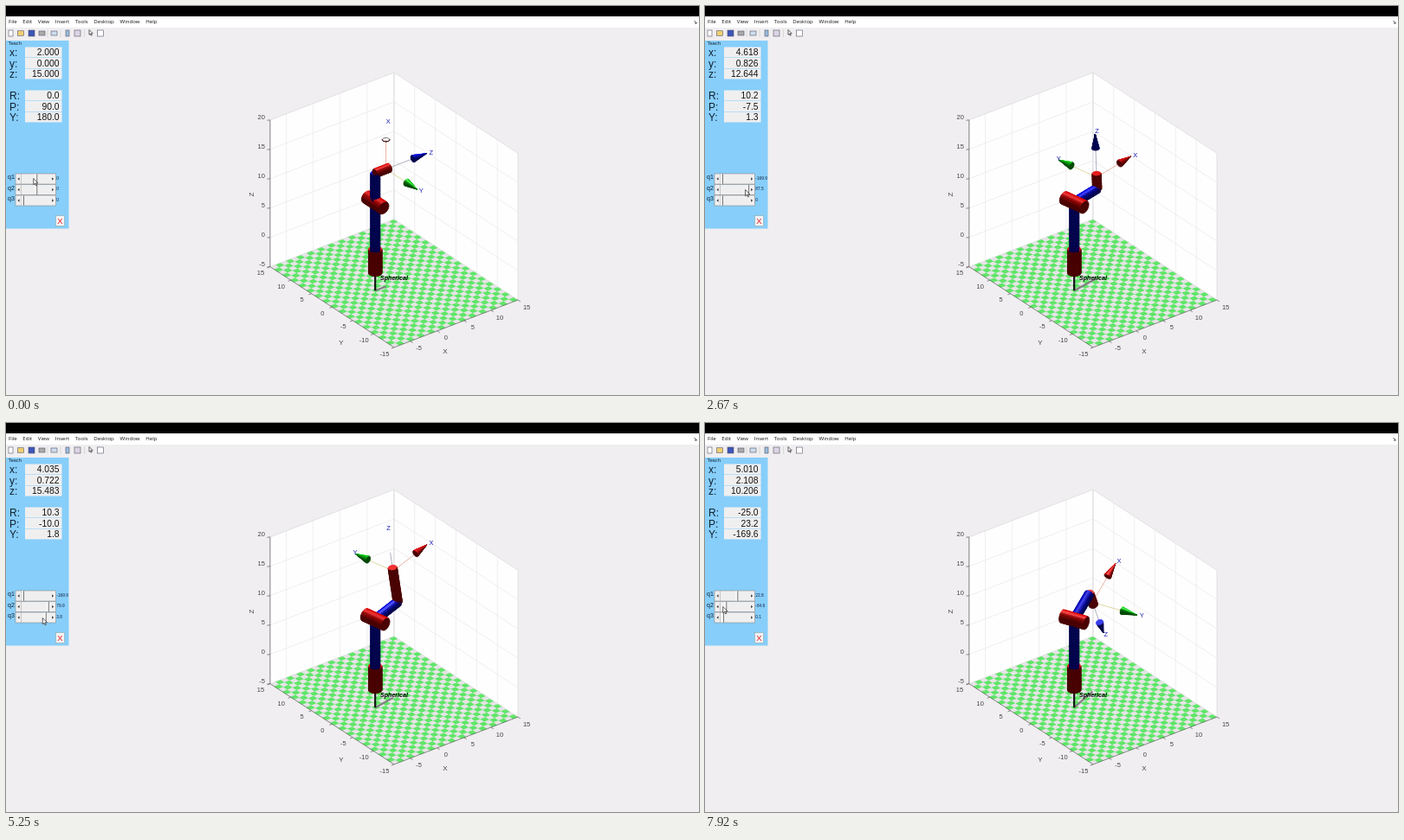
Animation of 800 by 450 pixels, one loop 8 s. Source, as an HTML page with a canvas:

```html
<!DOCTYPE html>
<html lang="en">
<head>
<meta charset="utf-8">
<title>Robot teach panel</title>
<style>
html, body { margin: 0; width: 800px; height: 450px; overflow: hidden; }
canvas { display: block; }
</style>
</head>
<body>
<canvas id="stage" width="800" height="450"></canvas>
<script>
const g = document.getElementById('stage').getContext('2d');
const LOOP = 8000, STEP = 1000 / 12, DEG = Math.PI / 180;
const RED = [245, 8, 8], BLUE = [8, 12, 255], GREEN = [10, 235, 20];
const INK = '#444';

// Slider drags; each one eases from the joint's present value
const drag = (joint, start, end, to) => ({ joint, start, end, to });
const DRAGS = [
  drag(0, 300, 950, -169.86),
  drag(1, 1546, 2891, 90),
  drag(1, 2950, 3550, -90),
  drag(2, 3650, 3830, .352),
  drag(1, 4200, 4700, 79.86),
  drag(2, 4882.1, 5425.1, 4.2),
  drag(2, 5500, 6000, .1412),
  drag(1, 6350, 6850, -50),
  drag(0, 7000, 7450, 22.82),
  drag(1, 7550, 7740, -64.649),
];
const RANGES = [[-170, 170], [-90, 90], [0, 4.5]];

const easeOut = u => 1 - (1 - Math.min(1, Math.max(0, u))) ** 2;
const progress = (t, a, b) => easeOut((t - a) / (b - a));
const mix = (a, b, k) => a + (b - a) * k;

const jointAt = (joint, t) => DRAGS.filter(d => d.joint === joint)
  .reduce((v, d) => mix(v, d.to, progress(t, d.start, d.end)), 0);

function thumbX(joint, v) {
  const [lo, hi] = RANGES[joint];
  return 20.5 + 30.5 * (v - lo) / (hi - lo);
}

// The mouse holds the thumb during a drag and glides to the next one
function mouseAt(t) {
  const hold = (d, time) => [thumbX(d.joint, jointAt(d.joint, time)) - 4, 199.5 + 13 * d.joint];
  const i = DRAGS.findIndex(d => t < d.end);
  if (i < 0) return hold(DRAGS[DRAGS.length - 1], t);
  const next = DRAGS[i], last = DRAGS[i - 1];
  if (!last || t >= next.start) return hold(next, t);
  const from = hold(last, last.end), to = hold(next, next.start);
  return from.map((c, k) => mix(c, to[k], progress(t, last.end, next.start)));
}

// Vectors and projection
const dot = (a, b) => a[0] * b[0] + a[1] * b[1] + a[2] * b[2];
const along = (p, d, k) => p.map((c, i) => c + d[i] * k);
const unit = v => v.map(c => c / Math.hypot(...v));
const cross = (a, b) => [a[1] * b[2] - a[2] * b[1], a[2] * b[0] - a[0] * b[2], a[0] * b[1] - a[1] * b[0]];
const project = ([x, y, z]) => [426.2 + 6.22 * x - 4.77 * y, 295.25 - 2.386 * x - 3.11 * y - 6.79 * z];
const CAMERA = [-.527, -.687, .5], LIGHT = unit([.25, .3, .92]);

function rect(x, y, w, h, fill, edge) {
  g.fillStyle = fill;
  g.fillRect(x, y, w, h);
  if (edge) { g.lineWidth = .6; g.strokeStyle = edge; g.strokeRect(x, y, w, h); }
}

function text(s, x, y, size, color = INK, align = 'left', style = '', font = '"Liberation Sans", Arial') {
  g.font = `${style} ${size}px ${font}, sans-serif`;
  g.textAlign = align;
  g.textBaseline = 'middle';
  g.fillStyle = color;
  g.fillText(s, x, y);
}

function trace(points, close) {
  g.beginPath();
  points.forEach(p => g.lineTo(...p));
  if (close) g.closePath();
}

function line(points, color, width = .6) {
  trace(points);
  g.strokeStyle = color;
  g.lineWidth = width;
  g.stroke();
}

function shape(points, fill, edge, width = .7) {
  trace(points, true);
  g.fillStyle = fill;
  g.fill();
  if (edge) { g.strokeStyle = edge; g.lineWidth = width; g.stroke(); }
}

const line3 = (a, b, color, width) => line([a, b].map(project), color, width);
const floorTile = (x, y, w, d, fill) =>
  shape([[x, y, -5], [x + w, y, -5], [x + w, y + d, -5], [x, y + d, -5]].map(project), fill);

// Keep the part of a polygon where the signed distance is positive
function clip(points, dist) {
  const out = [];
  points.forEach((p, i) => {
    const q = points[(i + 1) % points.length], a = dist(p), b = dist(q);
    if (a >= 0) out.push(p);
    if (a * b < 0) out.push(along(p, along(q, p, -1), a / (a - b)));
  });
  return out;
}
const inBox = points => clip(clip(points, p => p[0] + 8), p => 20.01 - p[2]);

let faces = [];
function face(points, normal, color) {
  if (dot(normal, CAMERA) <= 0) return;
  const visible = inBox(points);
  if (visible.length < 3) return;
  const lit = Math.max(0, dot(normal, LIGHT));
  const mirror = along(normal.map(c => 2 * lit * c), LIGHT, -1);
  const shine = lit && 90 * Math.max(0, dot(mirror, CAMERA)) ** 8;
  const rgb = color.map(c => Math.round(c * (.3 + .6 * lit) + shine));
  const depth = points.reduce((s, p) => s + dot(p, CAMERA), 0) / points.length;
  faces.push({ visible, depth, fill: `rgb(${rgb})` });
}

// Cylinder, or cone when the end radius is zero; returns the rim at its start
function solid(a, b, ra, rb, color) {
  const d = along(b, a, -1), len = Math.hypot(...d), u = unit(d);
  const v = unit(cross(u, Math.abs(u[2]) > .9 ? [1, 0, 0] : [0, 0, 1])), w = cross(u, v);
  const n = 24, segs = Math.ceil(len * 2);
  const spoke = i => {
    const f = i / n * 2 * Math.PI;
    return v.map((c, k) => c * Math.cos(f) + w[k] * Math.sin(f));
  };
  const rim = (i, s) => along(along(a, d, s), spoke(i), mix(ra, rb, s));
  const disc = s => Array.from({ length: n }, (_, i) => rim(i, s));
  for (let i = 0; i < n; i++) {
    const normal = unit(along(spoke(i + .5), u, (ra - rb) / len));
    for (let j = 0; j < segs; j++) {
      const s = j / segs, e = (j + 1) / segs;
      face([rim(i, s), rim(i + 1, s), rim(i + 1, e), rim(i, e)], normal, color);
    }
  }
  face(disc(0), u.map(c => -c), color);
  if (rb) face(disc(1), u, color);
  return disc(0);
}

function paintFaces() {
  faces.sort((a, b) => a.depth - b.depth);
  for (const f of faces) shape(f.visible.map(project), f.fill, f.fill, .8);
  faces = [];
}

function pose(t) {
  const q = RANGES.map((_, joint) => jointAt(joint, t));
  const s1 = Math.sin(q[0] * DEG), c1 = Math.cos(q[0] * DEG);
  const s2 = Math.sin(q[1] * DEG), c2 = Math.cos(q[1] * DEG);
  const X = [-s2 * c1, -s2 * s1, c2], Y = [s1, -c1, 0], Z = [c2 * c1, c2 * s1, s2];
  const elbow = along([0, 0, 10], X, 5);
  return { q, X, Y, Z, elbow, tool: along(elbow, Z, 2 + q[2]) };
}

function drawWindow() {
  rect(0, 0, 800, 450, '#f0eef0');
  rect(0, 0, 800, 12, '#000');
  rect(0, 12, 800, 13, '#fff');
  let x = 3;
  for (const name of 'File Edit View Insert Tools Desktop Window Help'.split(' ')) {
    text(name, x, 18.5, 6.1, '#111', 'left', '', '"Open Sans"');
    x += g.measureText(name).width + 6.7;
  }
  line([[794.5, 17], [797.5, 20], [795, 20]], '#333', .9);

  const icon = (x, fill, w = 7, h = 7) => rect(x, 31.5 - h / 2, w, h, fill, '#556');
  icon(3, '#fff', 5);
  icon(13.5, '#f0cf70', 7, 5.5);
  icon(26, '#3c55b8');
  icon(38, '#aaa', 7, 5);
  icon(52, '#cde', 7, 5);
  icon(69, '#9bd', 4);
  icon(79, '#dcd4e4');
  icon(105.5, '#fff');
  for (const x of [48, 63, 90.5]) line([[x, 27], [x, 36]], '#ccc');
  pointer(96, 27.5, .8);
}

function drawAxes() {
  const wall = corners => shape(corners.map(project), '#fefefe', '#d8d8da', .6);
  wall([[-8, 15, -5], [15, 15, -5], [15, 15, 20], [-8, 15, 20]]);
  wall([[15, 15, -5], [15, -15, -5], [15, -15, 20], [15, 15, 20]]);

  // The checks have one more square each way than the box has units
  const cols = 24, rows = 31, w = 23 / cols, d = 30 / rows;
  floorTile(-8, -15, 23, 30, '#e6e4e6');
  for (let i = 0; i < cols; i++) for (let j = 0; j < rows; j++) {
    if ((i + j) % 2) floorTile(-8 + i * w, -15 + j * d, w, d, '#5fe668');
  }

  const grid = '#e4e4e6';
  const label = (v, p, dx, dy, align = 'center') => {
    const [x, y] = project(p);
    text(v, x + dx, y + dy, 7.5, INK, align);
  };
  for (let v = -15; v <= 20; v += 5) {
    if (v >= -5) {
      line3([-8, 15, v], [15, 15, v], grid);
      line3([15, 15, v], [15, -15, v], grid);
      line3([-8, 15, v], [-8.4, 15.2, v], INK);
      label(v, [-8, 15, v], -6, -2.5, 'right');
    }
    if (v >= -5 && v <= 15) {
      line3([v, 15, -5], [v, 15, 20], grid);
      line3([v, -15, -5], [v, -15.6, -5], INK);
      label(v, [v, -15, -5], 10, 8.5);
    }
    if (v <= 15) {
      line3([15, v, -5], [15, v, 20], grid);
      line3([-8, v, -5], [-8.5, v, -5], INK);
      label(v, [-8, v, -5], -11, 7.5);
    }
  }
  line([[-8, 15, 20], [-8, 15, -5], [-8, -15, -5], [15, -15, -5]].map(project), INK);
  text('X', 507, 400, 8, INK, 'center');
  text('Y', 387, 390, 8, INK, 'center');
  g.save();
  g.translate(284, 218);
  g.rotate(-Math.PI / 2);
  text('Z', 0, 0, 8, INK, 'center');
  g.restore();
}

function drawRobot({ X, Y, Z, elbow, tool }) {
  line3([0, 0, -5], [tool[0], tool[1], -5], '#808080', 2.2);
  line3([0, 0, -5], [0, 0, 0], '#111', 2.2);
  const axes = [['X', X, RED, '#e2a088'], ['Y', Y, GREEN, '#d6cf8a'], ['Z', Z, BLUE, '#9a9cae']];
  const rings = [];
  for (const [, dir, color, thin] of axes) {
    const base = along(tool, dir, 5), tip = along(tool, dir, 7.5);
    line(inBox([tool, base]).map(project), thin, .8);
    const rim = solid(base, tip, .55, 0, color);
    if (base[2] > 19.9) rings.push(inBox(rim).map(project));
  }
  const shoulder = [0, 0, 10];
  solid([0, 0, -2], [0, 0, 2], 1, 1, RED);
  solid([0, 0, 0], shoulder, .7, .7, BLUE);
  solid(along(shoulder, Y, -2), along(shoulder, Y, 2), 1, 1, RED);
  solid(shoulder, elbow, .7, .7, BLUE);
  solid(elbow, along(tool, Z, .6), .67, .67, RED);
  paintFaces();
  for (const ring of rings) shape(ring, 'transparent', '#333');
  for (const [name, dir] of axes) text(name, ...project(along(tool, dir, 8)), 7.5, '#1c1cb4');
  text('Spherical', 432, 315, 7.1, '#000', 'left', 'italic bold');
}

// Tool position and roll, pitch, yaw
function readings({ X, Y, Z, tool }) {
  const singular = Math.abs(Z[0]) > .99999;
  const roll = singular ? 0 : -Math.atan2(Y[0], X[0]) / DEG;
  const yaw = singular ? 180 : -Math.atan2(Z[1] + 1e-9, Z[2]) / DEG;
  return [...tool.map(v => v.toFixed(3)),
    ...[roll, Math.asin(Z[0]) / DEG, yaw].map(v => v.toFixed(1))];
}

function drawPanel(t, q, values) {
  rect(0, 40, 72.5, 217.5, '#87cefa');
  text('Teach', 2.5, 43.5, 5.8, '#123');
  [...'xyzRPY'].forEach((name, i) => {
    const y = (i < 3 ? 54.2 : 66.7) + i * 12.5;
    rect(22, y - 6.7, 42.5, 12, '#f0eff0');
    text(name + ':', 4, y + .5, 12, '#123');
    text(values[i], 61.5, y, 10.3, '#111', 'right');
  });
  q.forEach((v, i) => {
    const y = 194 + i * 12.5, x = thumbX(i, v);
    const touched = t > DRAGS.find(d => d.joint === i).start - 300;
    text(`q${i + 1}`, 2, y + 4.5, 7, '#123');
    rect(11, y, 46.5, 12, '#f0eff0', '#8a8a8a');
    line([[17.5, y], [17.5, y + 12]], '#aaa');
    rect(x - 2.8, y + .5, 2.8, 11, '#f8f8f8');
    line([[x, y + .3], [x, y + 11.8]], '#555', .8);
    for (const side of [-1, 1]) {
      const ax = 34.3 + 19.8 * side;
      shape([[ax - side, y + 4.3], [ax + side, y + 6], [ax - side, y + 7.7]], '#333');
    }
    text(touched ? v.toFixed(1) : '0', 58.3, y + 5.5, 4.8, '#124');
  });
  rect(57.5, 242.5, 10, 12, '#f4f2f4', '#8aa');
  text('X', 62.5, 249, 9.5, '#e01818', 'center');
}

function pointer(x, y, k = 1) {
  const outline = [[0, 0], [0, 7.2], [1.7, 5.7], [2.9, 8.4], [4, 7.9], [2.9, 5.3], [5.2, 5.3]];
  shape(outline.map(p => [x + p[0] * k, y + p[1] * k]), '#fff', '#222');
}

function draw(t) {
  const now = pose(t);
  drawWindow();
  drawAxes();
  drawRobot(now);
  // The read-out trails the arm by two updates
  drawPanel(t, now.q, readings(pose(t - 2 * STEP)));
  pointer(...mouseAt(t));
}

let shown = -1;
const begin = performance.now();
function tick() {
  const t = (performance.now() - begin) % LOOP;
  const step = Math.floor((t + 5) / STEP) % 96;
  if (step !== shown) draw((shown = step) * STEP);
  requestAnimationFrame(tick);
}
tick();
</script>
</body>
</html>
```
